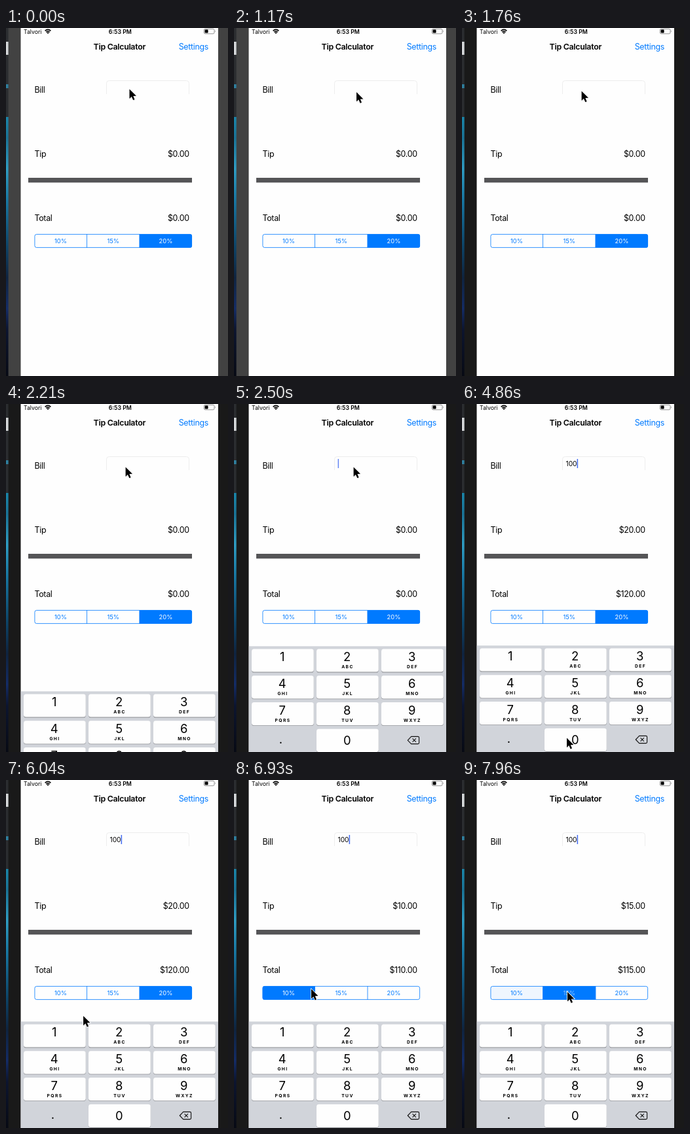
Write an HTML page that moves like this. It is 339x532 px and loops after 8 s.

```html
<!DOCTYPE html>
<html lang="en">
<head>
<meta charset="utf-8">
<title>Tip Calculator</title>
<style>
html, body { margin: 0; width: 100%; height: 100%; overflow: hidden; background: #fefefe; }
svg { display: block; width: 339px; height: 532px; font-family: Inter, Roboto, "Liberation Sans", sans-serif; }
text { fill: #000; }
.label { font-size: 12.4px; letter-spacing: -.3px; }
.end { text-anchor: end; }
.mid { text-anchor: middle; }
.status { font-size: 8.7px; }
.digit { font-size: 18.4px; text-anchor: middle; }
.letters { font-size: 6.7px; font-weight: 700; letter-spacing: 1.4px; text-anchor: middle; }
.seg { font-size: 9.4px; text-anchor: middle; }
</style>
</head>
<body>
<svg viewBox="0 0 339 532">
  <defs>
    <linearGradient id="wall" x1="0" y1="0" x2="0" y2="1">
      <stop offset="0" stop-color="#1a86aa"/>
      <stop offset=".08" stop-color="#1a7396"/>
      <stop offset=".2" stop-color="#2f9cc2"/>
      <stop offset=".32" stop-color="#1878a4"/>
      <stop offset=".5" stop-color="#0d4468"/>
      <stop offset=".62" stop-color="#0f2440"/>
      <stop offset=".74" stop-color="#142c66"/>
      <stop offset=".82" stop-color="#0c1530"/>
      <stop offset="1" stop-color="#070a14"/>
    </linearGradient>
    <clipPath id="segClip"><rect x="43.5" y="315" width="240.5" height="21" rx="3"/></clipPath>
    <clipPath id="screen"><rect x="22.5" width="301.5" height="532"/></clipPath>
  </defs>
  <rect width="339" height="532" fill="#fefefe"/>
  <g id="frame">
    <rect width="22.5" height="532"/>
    <rect x="324" width="15" height="532"/>
  </g>
  <rect width="3.6" height="136" fill="#2b2d30"/>
  <rect y="21" width="3.6" height="20" fill="#d5d7d9"/>
  <rect y="86" width="3.6" height="6" fill="#2f7f9e"/>
  <rect y="136" width="3.6" height="396" fill="url(#wall)"/>

  <text class="status" x="27" y="8.6">Talvori</text>
  <g fill="none" stroke="#000" stroke-width="1.6">
    <path d="M59.6 4.4Q64 .2 68.4 4.4M61.3 6.4Q64 3.9 66.7 6.4"/>
    <path d="M62.4 7.2Q64 5.8 65.6 7.2L64 9Z" fill="#000" stroke="none"/>
  </g>
  <text class="status mid" x="174.3" y="8.6" font-weight="600">6:53 PM</text>
  <rect x="302.4" y="1.4" width="15.6" height="7.4" rx="1.8" fill="none" stroke="#777" stroke-width=".8"/>
  <rect x="303.6" y="2.6" width="5" height="5" rx=".8"/>
  <path d="M319 3.6q1.5 1.5 0 3z" fill="#777"/>

  <text class="label mid" x="173.3" y="32.6" font-weight="600">Tip Calculator</text>
  <text class="label end" x="309" y="32.6" style="fill:#007aff">Settings</text>
  <text class="label" x="43.5" y="98.6">Bill</text>
  <text class="label" x="43.5" y="196.8">Tip</text>
  <text class="label" x="43.5" y="295">Total</text>
  <text class="label end" id="tip" x="279.8" y="196.8"></text>
  <text class="label end" id="total" x="279.8" y="295"></text>
  <path d="M153.5 101V84.5q0-4 4-4H275.5q4 0 4 4V101" fill="none" stroke="#ebebeb" stroke-width=".9"/>
  <text id="bill" x="158.6" y="94.8" font-size="10.2" letter-spacing="-.1"></text>
  <rect id="caret" y="84" width="1.5" height="14" fill="#426bf2"/>
  <rect x="34" y="229" width="250" height="7.3" fill="#555557"/>
  <g id="segs" clip-path="url(#segClip)"></g>
  <path d="M123.5 315V336M204 315V336" stroke="#007aff" stroke-width=".8"/>
  <rect x="43.9" y="315.4" width="239.7" height="20.2" rx="2.8" fill="none" stroke="#007aff" stroke-width=".8"/>
  <g id="segText"></g>
  <g clip-path="url(#screen)"><g id="pad"><rect x="22.5" y="369.3" width="301.5" height="165" fill="#d1d4da"/></g></g>
  <g id="cursor">
    <path d="M.8 1.3V15.6L4.2 12.6 6.5 17.6 8.8 16.5 6.6 11.6 11 11.4Z" fill="#000" opacity=".18"/>
    <path d="M0 0V14.6L3.3 11.6 5.7 16.9 8 15.8 5.8 10.7 10.4 10.4Z" fill="#000" stroke="#fff" stroke-width="1.6" paint-order="stroke"/>
  </g>
</svg>
<script>
const LOOP = 8000, STEP = 147.3, LEAD = 14;
const BLUE = '#007aff', PRESSED = '#b7c1cf';
const $ = id => document.getElementById(id);

function add(parent, tag, attrs, text) {
  const el = document.createElementNS('http://www.w3.org/2000/svg', tag);
  for (const name in attrs) el.setAttribute(name, attrs[name]);
  if (text) el.textContent = text;
  parent.append(el);
  return el;
}

// Keypad
const letters = ['', 'ABC', 'DEF', 'GHI', 'JKL', 'MNO', 'PQRS', 'TUV', 'WXYZ'];
const keys = {};
function addKey(name, col, row, sub) {
  const x = 27 + col * 99, y = 373.4 + row * 40.8, cx = x + 47.3;
  add($('pad'), 'rect', { x, y: y + .9, width: 94.8, height: 35.2, rx: 3.6, fill: '#8b8d92' });
  keys[name] = add($('pad'), 'rect', { x, y, width: 94.8, height: 35.2, rx: 3.6 });
  add($('pad'), 'text', { class: 'digit', x: cx - .6, y: y + (name === '0' ? 24 : 19) }, name);
  if (sub) add($('pad'), 'text', { class: 'letters', x: cx + .2, y: y + 29.8 }, sub);
}
letters.forEach((sub, i) => addKey(String(i + 1), i % 3, Math.floor(i / 3), sub));
addKey('0', 1, 3);
add($('pad'), 'text', { class: 'digit', x: 71.5, y: 518 }, '.');
add($('pad'), 'path', {
  d: 'M265.3 513L270.6 507.4H281Q282.6 507.4 282.6 509V517Q282.6 518.6 281 518.6H270.6ZM272.6 510.4L277.8 515.6M277.8 510.4L272.6 515.6',
  fill: 'none', stroke: '#111', 'stroke-width': 1.1, 'stroke-linejoin': 'round'
});

// Segmented control
const rates = [10, 15, 20];
const segs = rates.map((r, i) => add($('segs'), 'rect', { x: 43.4 + i * 80.2, y: 315, width: 80.3, height: 21, fill: BLUE }));
const segTexts = rates.map((r, i) => add($('segText'), 'text', { class: 'seg', x: 83.4 + i * 80.3, y: 329 }, r + '%'));

// Cursor path: step, x, y
const path = [
  [0, 188.5, 93.4], [4, 192.5, 96.5], [5, 192.5, 96.5], [8, 187, 98], [10, 182.6, 96.4],
  [19, 182.6, 96.4], [24, 95, 371.5], [26, 97, 373], [27, 130, 447], [28, 160, 510.5],
  [35, 160, 510.5], [38, 172.5, 430], [43, 88.5, 323], [45, 88.5, 323], [47, 118, 319.6],
  [51, 161, 324], [60, 161, 324]
];
const ease = p => p * p * (3 - 2 * p);
function cursorAt(k) {
  const i = path.findIndex(p => p[0] > k);
  const [a, x, y] = path[i - 1], [b, u, v] = path[i];
  const p = ease((k - a) / (b - a));
  return [x + (u - x) * p, y + (v - y) * p];
}

// Typing and selection: step, value
const typed = [[0, ''], [26, '1'], [30, '10'], [33, '100']];
const picks = [[0, 2], [45, 0], [54, 1]];
const latest = (list, k) => list.filter(e => e[0] <= Math.max(0, k)).pop();
const pickAt = k => latest(picks, k)[1];

function segAlpha(i, k) {
  return i === pickAt(k) ? 1 : i === pickAt(k - 1) ? .06 : i === pickAt(k + 1) ? .12 : 0;
}

function segColor(i, k) {
  if (i !== pickAt(k)) return BLUE;
  return i === pickAt(k - 1) ? '#fff' : '#8cc4ff';
}

function caretAlpha(k) {
  if (k < 16) return 0;
  if (k < 18) return k === 16 ? .5 : .8;
  const since = Math.max(17, latest(typed, k)[0]);
  const phase = (k - since) * STEP % 960;
  return phase > 430 && phase < 725 ? 0 : 1;
}

const money = n => '$' + n.toFixed(2);
function setFill(el, color) { el.style.fill = color; }

function draw(ms) {
  const k = Math.floor((ms + LEAD) / STEP);
  setFill($('frame'), k < 12 ? '#424242' : '#191919');

  const bill = latest(typed, k)[1];
  const tip = bill * rates[pickAt(k)] / 100;
  $('bill').textContent = bill;
  $('tip').textContent = money(tip);
  $('total').textContent = money(+bill + tip);

  $('caret').setAttribute('x', [158.6, 163.5, 169.6, 175.6][bill.length]);
  $('caret').setAttribute('opacity', caretAlpha(k));

  rates.forEach((r, i) => {
    segs[i].setAttribute('opacity', segAlpha(i, k));
    setFill(segTexts[i], segColor(i, k));
  });

  const drop = k < 15 ? 170 : 70 * Math.pow(.12, k - 15);
  $('pad').setAttribute('transform', `translate(0 ${drop})`);
  const down = k === 25 ? '1' : k === 29 || k === 31 || k === 32 ? '0' : '';
  for (const name in keys) setFill(keys[name], name === down ? PRESSED : '#fefefe');

  $('cursor').setAttribute('transform', `translate(${cursorAt(k)})`);
}

const start = performance.now();
function tick() {
  draw((performance.now() - start) % LOOP);
  requestAnimationFrame(tick);
}
tick();
</script>
</body>
</html>
```
